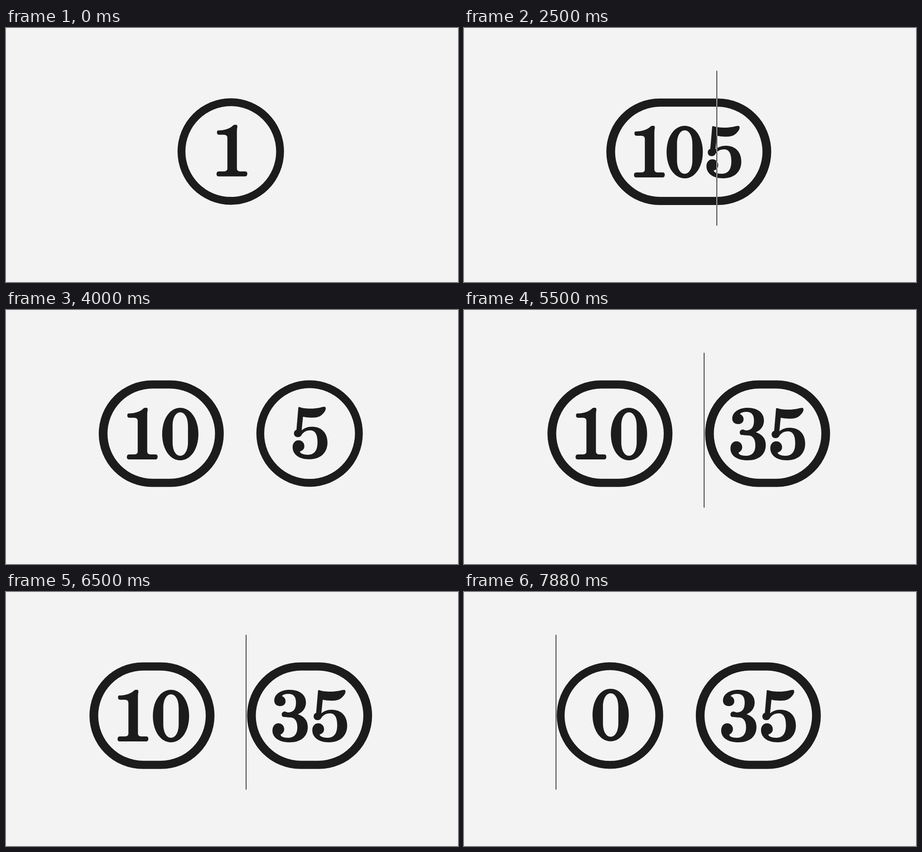
Animation, 998 px wide and 561 px high, one loop 8 s. Source, as an HTML page:

```html
<!DOCTYPE html>
<html lang="en">
<head>
<meta charset="utf-8">
<title>Number tokens</title>
<style>
  html, body { margin: 0; width: 100%; height: 100%; overflow: hidden; background: #f3f3f3; }
  svg { display: block; width: 100%; height: 100%; }
  .ink { fill: #1c1c1c; }
  .paper { fill: #f3f3f3; }
  .caret { fill: #fff; mix-blend-mode: difference; }
</style>
</head>
<body>
<svg viewBox="0 0 998 561" role="img" aria-label="Numbers typed, split and joined">
  <defs>
    <path id="d1" d="M4 12.5C18 12.5 30 8 36 2Q38 0 40 0H44Q46.500 1 46 5Q45 9 45 14V96Q45 103 52 103H63Q68 103 68 108Q68 114 63 114H5Q0 114 0 109Q0 103 5 103H15Q24 103 24 97V29Q24 22 16 22H6Q1 22 1 17Q1 12.500 4 12.500Z"/>
    <path id="d0" fill-rule="evenodd" d="M40 0C63 0 80 25 80 58S63 116 40 116S0 91 0 58S17 0 40 0ZM40 10C30 10 23 22 23 40V76C23 94 30 106 40 106S57 94 57 76V40C57 22 50 10 40 10Z"/>
    <path id="d3" d="M4 24C4 10 18 0 38 0C60 0 74 11 74 28C74 41 66 50 56 54C69 58 78 67 78 82C78 103 63 116 38 116C15 116 0 106 0 90C0 80 6 74 13 74C21 74 26 80 26 87C26 94 21 97 18 99C18 103 24 106 34 106C48 106 55 98 55 83C55 68 49 61 38 61C32 61 29 60 25 60C22 60 20.500 57 20.500 54.500C20.500 51 23 48 27 48C30 48 31 50 36 50C47 49 52 42 52 28C52 15 46 9 36 9C28 9 22 11 21 14C26 16 29 20 29 25C29 32 24 36 17 36C9 36 4 31 4 24Z"/>
    <path id="d5" d="M16 1C24 4 46 6 64 1C68 0 70 0 72 .5C74.500 3 73 8 70 12C63 21 56 24 44 24C34 24 28 23 23 22L20 52C26 47 33 44 43 44C64 44 77 58 77 79C77 102 61 116 37 116C14 116 0 105 0 89C0 80 6 74 13 74C21 74 26 80 26 87C26 95 20 97 16 99C17 103 24 106 33 106C47 106 55 98 55 78C55 60 49 52 39 52C30 52 24 56 20 62C18 66 15 67 11 67C7 67 3 64 3 59C3 54 6 51.500 8.500 51L12.500 4C12.500 1 13 0 16 1Z"/>
  </defs>
  <rect class="paper" width="998" height="561"/>
  <g id="scene"></g>
</svg>
<script>
const LOOP = 8000, CENTER = 496.3, GAP = 72, HEIGHT = 235.2;
const scene = document.getElementById('scene');
const widths = [0, 235, 276, 364, 452];

// left edge of each digit inside its pill
const offsets = {
  1: [86], 0: [79], 5: [80], 10: [62, 140], 35: [56, 144],
  105: [61, 133, 221], 1035: [65, 137, 221, 309]
};

// start time, numbers on stage, caret x (0 = hidden)
const steps = [
  [0, '1', 0],
  [500, '1', 617],
  [750, '10', 0],
  [880, '10', 637.2],
  [1250, '10', 0],
  [1630, '10', 637.2],
  [1880, '105', 0],
  [2500, '105', 558.3],
  [2750, '10 5', 550.4],
  [3250, '10 5', 0],
  [3630, '10 5', 550.4],
  [4000, '10 5', 0],
  [4250, '10 35', 670.5],
  [4630, '10 35', 0],
  [5130, '10 35', 670.5],
  [5500, '10 35', 530.2],
  [5750, '1035', 438],
  [6130, '1035', 0],
  [6500, '10 35', 530.2],
  [6880, '10 35', 0],
  [7380, '10 35', 530.2],
  [7500, '10 35', 463],
  [7630, '10 35', 322.5],
  [7880, '0 35', 203.2]
];

// rectangle with fully round ends
function capsule(cls, x, y, w, h) {
  return `<rect class="${cls}" x="${x}" y="${y}" width="${w}" height="${h}" rx="${h / 2}"/>`;
}

function pill(text, x) {
  const w = widths[text.length], single = text.length === 1;
  const side = single ? 17.3 : 19.3, edge = single ? 17.3 : 18;
  const top = 154.9 + 0.3 * text.length;
  const y = single ? 213.7 : 216;
  const ring = capsule('ink', x, top, w, HEIGHT) +
    capsule('paper', x + side, top + edge, w - 2 * side, HEIGHT - 2 * edge);
  const digits = [...text].map((d, i) =>
    `<use class="ink" href="#d${d}" x="${x + offsets[text][i]}" y="${y}"/>`);
  return ring + digits.join('');
}

function draw([, text, caret]) {
  const parts = text.split(' ');
  const total = parts.reduce((sum, p) => sum + widths[p.length] + GAP, -GAP);
  let x = CENTER - total / 2, out = '';
  for (const p of parts) {
    out += pill(p, x);
    x += widths[p.length] + GAP;
  }
  if (caret) out += `<rect class="caret" x="${caret - 0.75}" y="94.5" width="1.5" height="342"/>`;
  scene.innerHTML = out;
}

let shown = null;
const start = performance.now();
function tick(now) {
  const t = Math.max(0, now - start) % LOOP;
  const step = steps.findLast(s => s[0] <= t);
  if (step !== shown) draw(shown = step);
  requestAnimationFrame(tick);
}
tick(start);
</script>
</body>
</html>
```
